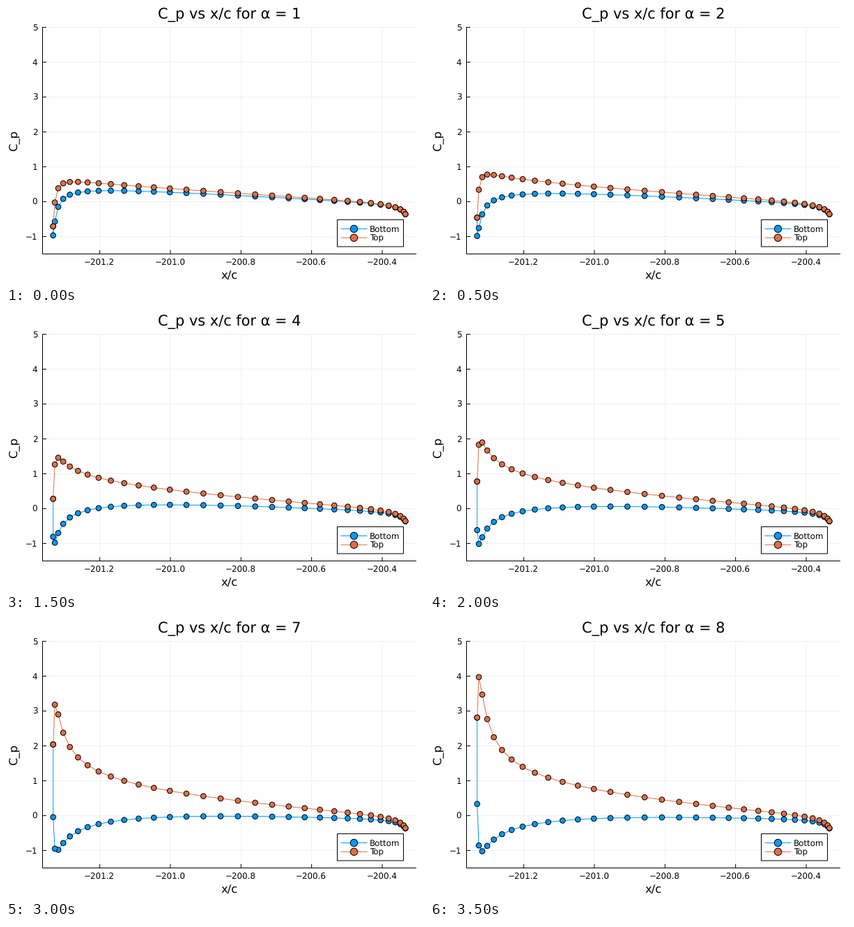
Recreate the animation shown at these times as a matplotlib script. Size 600x400 px, loop 4000 ms.

```python
import numpy as np
import matplotlib.pyplot as plt
from matplotlib.animation import FuncAnimation
from matplotlib.patches import Rectangle

W, H, DPI = 600, 400, 100
PT = 72 / DPI
BLUE, ORANGE, GRID = "#009AF9", "#E26F46", "#f0f0f0"
LEFT, RIGHT, TOP, BASE = 52.5, 588.5, 30.5, 355.5
TICK, LABEL, TITLE = 11.9, 16.4, 20.85
N = 32

plt.rcParams["font.family"] = "DejaVu Sans"
plt.rcParams["text.hinting"] = "none"
fig = plt.figure(figsize=(W / DPI, H / DPI), dpi=DPI, facecolor="white")
ax = fig.add_axes([0, 0, 1, 1])

# Centres of cosine-spaced panels along the chord, from nose to tail
k = np.arange(N)
x = (1 - np.cos(np.pi * (k + .5) / N) * np.cos(np.pi / 2 / N)) / 2
xs = 67.67 + 505.66 * (x - x[0]) / (x[-1] - x[0])


def nose(d, p):
    """Fall-off of the flow speed towards the rounded nose."""
    return 1 / (1 + (d / x)**p)


# Thickness part, its growth with angle squared, and the lift part
tail = .323 * np.exp(-11.5 * (1 - x)**.65)
thickness = (1.54 - .62 * x) * nose(.0069, 1.22) - tail - 1
growth = (1 - x) / (.25 + 285 * x**1.5)**(2 / 3) - .03 * (1 - x**3)
lift = (.36 - .177 * x) * np.sqrt((1 - x) / x) * nose(.0056, 1.3)
bend = .19 * np.exp(-.42 * k) - .03


def pressure(alpha):
    even = thickness + growth * (alpha**2 - 1) / 63
    odd = lift * alpha / 8 * (1 - bend * (64 - alpha**2) / 64)
    return even + odd, even - odd


def y_px(cp):
    return 280.5 - 50 * cp


def line(x, y, color="black", width=1, z=2):
    return ax.plot(x, y, color=color, lw=width * PT, zorder=z, snap=False)[0]


def dots(x, y, color, size, z):
    marks = ax.scatter(x, y, s=(size * PT)**2, edgecolors="black",
                       linewidths=PT, zorder=z)
    # Two equal fills keep the markers at sub-pixel positions
    marks.set_facecolor([color, color])
    return marks


def text(x, y, s, px, ha="center", **kw):
    return ax.text(x, y, s, fontsize=px * PT, ha=ha, **kw)


# Grid, ticks and their labels
for i in range(5):
    gx = 134.6 + 101.35 * i
    line([gx, gx], [TOP, BASE], GRID, z=1)
    line([gx, gx], [BASE, BASE - 5])
    text(gx - .6, 371.5, f"\u2212{201.2 - .2 * i:.1f}", TICK)
for v in range(-1, 6):
    gy = y_px(v)
    line([LEFT, RIGHT], [gy, gy], GRID, z=1)
    line([LEFT, LEFT + 5], [gy, gy])
    text(45.2, gy + 4.3, str(v).replace("-", "\u2212"), TICK, ha="right")
line([LEFT, LEFT, RIGHT], [TOP, BASE, BASE])

title = text(320.5, 18.3, "", TITLE)
text(320.5, 392, "x/c", LABEL)
text(20.5, 193, "C_p", LABEL, ha="right", va="center", rotation=90)

# Legend
ax.add_patch(Rectangle((475.5, 306.5), 95, 38.5, fc="white", ec="black",
                       lw=PT, zorder=7, snap=False))
for name, color, y in (("Bottom", BLUE, 319.5), ("Top", ORANGE, 332.3)):
    line([481, 518], [y, y], color, z=8)
    dots([499.5], [y], color, 10.4, 9)
    text(522, y + 4.3, name, TICK, ha="left", zorder=9)

bottom_line, bottom_dots = line([], [], BLUE, z=3), dots([], [], BLUE, 7.6, 4)
top_line, top_dots = line([], [], ORANGE, z=5), dots([], [], ORANGE, 7.6, 6)

ax.set_xlim(0, W)
ax.set_ylim(H, 0)
ax.axis("off")


def place(curve, marks, px, cp):
    curve.set_data(px, y_px(cp))
    marks.set_offsets(np.column_stack([px, y_px(cp)]))


def update(i):
    alpha = i + 1
    top, bottom = pressure(alpha)
    # The lower curve wraps round the nose to the first upper point
    place(bottom_line, bottom_dots,
          np.append(xs[::-1], xs[0]), np.append(bottom[::-1], top[0]))
    place(top_line, top_dots, xs, top)
    title.set_text(f"C_p vs x/c for \u03b1 = {alpha}")
    return bottom_line, bottom_dots, top_line, top_dots, title


anim = FuncAnimation(fig, update, frames=8, interval=500, repeat=True,
                     repeat_delay=0, blit=False)
plt.show()
```
